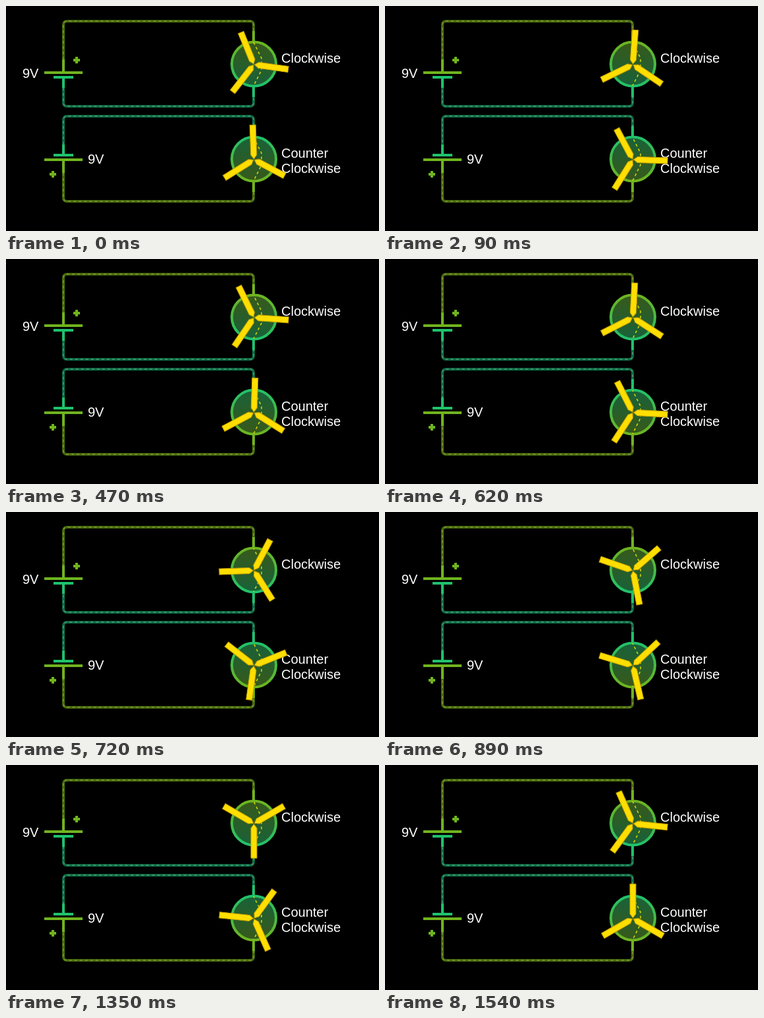
Animation of 565x341 px, one loop 1.57 s. Source, as an HTML page with a canvas:

```html
<!DOCTYPE html>
<html lang="en">
<head>
<meta charset="utf-8">
<title>Two motors</title>
<style>
  html, body { margin: 0; width: 100%; height: 100%; overflow: hidden; background: #000; }
  canvas { display: block; }
</style>
</head>
<body>
<canvas id="stage" width="565" height="341"></canvas>
<script>
const ctx = document.getElementById('stage').getContext('2d');
const LOOP = 1570, MOTOR_X = 375.5, LEFT = 87, RIGHT = 375, DASH = [4, 4];
const plus = { line: '#70b41e', wire: '#446c0c', dash: '#77862f', fill: '#38591a', plate: 29, lead: 20 };
const minus = { line: '#1fc26c', wire: '#0c6c46', dash: '#418c62', fill: '#18623a', plate: 15, lead: 16 };

// [start in ms, turn in degrees]: the rotor holds each pose until the next start
const poses = [
  [0, 0], [90, 26], [160, 43], [240, 64], [340, 82], [400, 97], [470, 116],
  [570, 133], [620, 145], [670, 156], [720, 170], [790, 191], [900, 216],
  [1010, 241], [1120, 262], [1180, 277], [1260, 296], [1350, 322],
  [1490, 344], [1540, 358]
];

function stroke(color, width, trace) {
  ctx.strokeStyle = color;
  ctx.lineWidth = width;
  ctx.beginPath();
  trace();
  ctx.stroke();
}

function line(color, x1, y1, x2, y2) {
  stroke(color, 4, () => { ctx.moveTo(x1, y1); ctx.lineTo(x2, y2); });
}

function dashed(color, width, offset, trace) {
  ctx.setLineDash(DASH);
  ctx.lineDashOffset = offset;
  stroke(color, width, trace);
  ctx.setLineDash([]);
}

// Wire from the battery side to the motor side, along the row y
function wire(pole, y, batteryEnd, motorEnd, offset) {
  const trace = () => {
    ctx.moveTo(LEFT, batteryEnd);
    ctx.arcTo(LEFT, y, RIGHT, y, 5);
    ctx.arcTo(RIGHT, y, RIGHT, motorEnd, 5);
    ctx.lineTo(RIGHT, motorEnd);
  };
  stroke(pole.wire, 4, trace);
  dashed(pole.dash, 2, offset, trace);
}

function gradient(y, from, to) {
  const g = ctx.createLinearGradient(0, y - 35, 0, y + 35);
  g.addColorStop(0, from);
  g.addColorStop(1, to);
  return g;
}

// Half of a circuit; side is -1 above the battery and 1 below it
function branch(pole, side, row, plateY, motorY, offset) {
  const batteryEnd = plateY + side * pole.lead, motorEnd = motorY + side * 50;
  wire(pole, row, batteryEnd, motorEnd, offset);
  line(pole.line, LEFT, batteryEnd, LEFT, plateY);
  line(pole.line, RIGHT, motorEnd, RIGHT, motorY + side * 34);
  line(pole.line, LEFT - pole.plate, plateY, LEFT + pole.plate, plateY);
}

function circuit(upper, lower, rows, plates, motorY, flow) {
  branch(upper, -1, rows[0], plates[0], motorY, -flow);
  branch(lower, 1, rows[1], plates[1], motorY, flow);

  const ring = () => ctx.arc(MOTOR_X, motorY, 33.5, 0, 7);
  ctx.fillStyle = gradient(motorY, upper.fill, lower.fill);
  ctx.beginPath();
  ring();
  ctx.fill();
  stroke(gradient(motorY, upper.line, lower.line), 4, ring);
  dashed('#d9dc00', 1.5, -flow, () => {
    ctx.moveTo(RIGHT, motorY - 33);
    ctx.lineTo(387, motorY - 9);
    ctx.lineTo(387, motorY + 9);
    ctx.lineTo(RIGHT, motorY + 33);
  });
}

function plusSign(x, y) {
  line(plus.line, x - 5, y, x + 5, y);
  line(plus.line, x, y - 5, x, y + 5);
}

function rotor(y, degrees) {
  ctx.save();
  ctx.translate(MOTOR_X, y + 0.7);
  ctx.rotate(degrees * Math.PI / 180);
  ctx.fillStyle = '#ffde00';
  for (let i = 0; i < 3; i++) {
    stroke('#c09c00', 1, () => {
      ctx.moveTo(0, -1);
      ctx.lineTo(-4.5, -7);
      ctx.lineTo(-4.5, -52.5);
      ctx.lineTo(4.5, -52.5);
      ctx.lineTo(4.5, -7);
      ctx.closePath();
      ctx.fill();
    });
    ctx.rotate(Math.PI * 2 / 3);
  }
  ctx.restore();
}

function text(label, x, y) {
  ctx.fillStyle = '#fff';
  ctx.font = '20px "Liberation Sans", Arial, sans-serif';
  ctx.fillText(label, x, y);
}

function draw(now) {
  const t = now % LOOP;
  const turn = poses.findLast(p => p[0] <= t)[1];
  const flow = turn / 360 * 64;
  ctx.fillStyle = '#000';
  ctx.fillRect(0, 0, 565, 341);
  circuit(plus, minus, [23, 152], [101, 108], 88, flow);
  circuit(minus, plus, [167, 296], [226, 233], 232, -flow);
  plusSign(107, 82);
  plusSign(71, 255);
  text('9V', 25, 109);
  text('9V', 124, 239);
  text('Clockwise', 417, 86);
  text('Counter', 417, 230);
  text('Clockwise', 417, 253);
  rotor(88, turn - 22);
  rotor(232, -2 - turn);
  requestAnimationFrame(draw);
}
draw(0);
</script>
</body>
</html>
```
